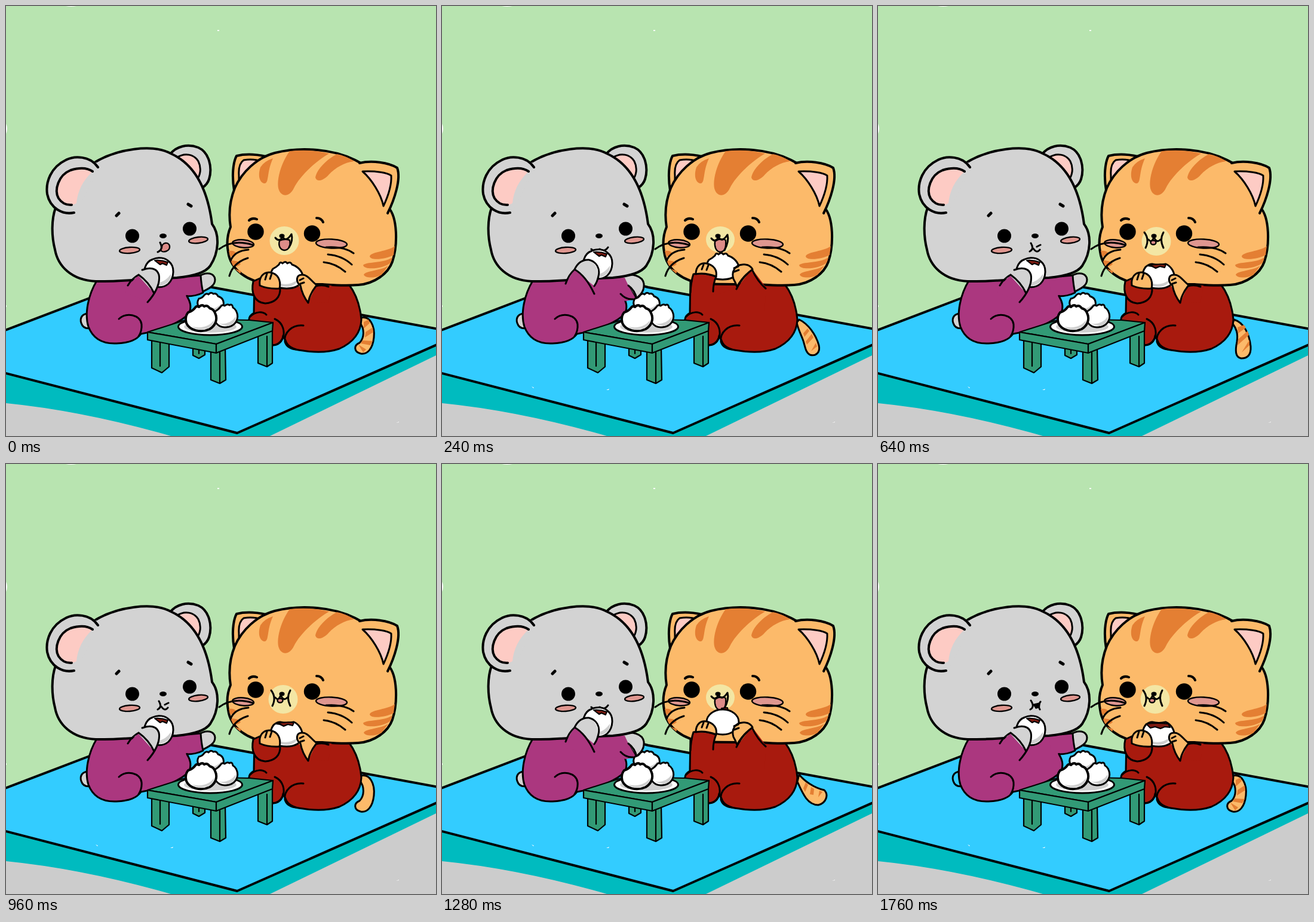
Write an HTML page that moves like this. It is 720 px wide and 720 px high and loops after 1840 ms.

```html
<!DOCTYPE html>
<html lang="en">
<head>
<meta charset="utf-8">
<title>Sharing steamed buns</title>
<style>
  html, body { margin: 0; width: 100%; height: 100%; overflow: hidden; background: #b8e4b0; }
  svg { display: block; width: 100vw; height: 100vh; }
  path, ellipse { stroke: #000; stroke-width: 4; stroke-linecap: round; stroke-linejoin: round; fill: none; }
  .thin { stroke-width: 3; }
  .bold { stroke-width: 5; }
  .flat, .flat * { stroke: none; }
  .wall { fill: #b8e4b0; }
  .floor { fill: #ccc; }
  .side { fill: #00bbbf; }
  .mat { fill: #3cf; }
  .gray { fill: #d3d3d3; }
  .purple { fill: #ab377f; }
  .orange { fill: #fcba6a; }
  .stripe { fill: #e47f33; stroke: none; }
  .red { fill: #a81a0e; }
  .pink { fill: #fdcbc4; }
  .blush { fill: #df9790; stroke-width: 2.4; }
  .tongue { fill: #dd8c88; stroke-width: 2.4; }
  .white { fill: #fff; }
  .shade { fill: #cfcfcf; stroke: none; }
  .filling { fill: #7d1a10; stroke-width: 2; }
  .black { fill: #000; stroke: none; }
  .cream { fill: #f3e6a4; stroke: none; }
  .wood * { fill: #329a76; stroke-width: 2.2; }
</style>
</head>
<body>
<svg viewBox="0 0 720 720">
  <defs>
    <g id="mouseBun">
      <path class="white thin" d="M246 424C254 420 267 421 273 428C283 436 282 455 272 465C262 474 243 472 235 460C227 446 233 428 246 424Z"/>
      <path class="shade" d="M247 463Q264 466 276 449C278 460 266 471 249 468Z"/>
      <path class="filling" d="M249 426Q260 425 271 429L269 434L262 431L258 433Z"/>
    </g>
    <path id="wholeBun" class="white thin" d="M447 440Q453 437 457 433Q459 427 463 431Q468 426 471 431Q476 427 479 433C488 436 497 444 497 454C497 467 484 473 470 473C454 473 442 467 443 454Q443 445 447 440Z"/>
    <path id="bunShade" class="shade" d="M452 461Q470 472 489 458Q484 471 468 470Q456 470 452 461Z"/>
    <g id="chew">
      <ellipse class="cream" cx="466" cy="394" rx="24.5" ry="24"/>
      <path class="thin" d="M446 379Q455 391 448 405M478 379Q471 391 478 405M453 391Q458 398 462 387Q467 398 473 391"/>
      <ellipse class="tongue" cx="461" cy="396" rx="4.5" ry="3.5"/>
    </g>
  </defs>

  <!-- room and mat -->
  <g class="flat">
    <path class="wall" d="M0 0H720V720H0Z"/>
    <path class="floor" d="M0 640L387 690L720 575V720H0Z"/>
    <path class="side" d="M0 615L387 700L720 568V585L442 720H276Q130 678 0 665Z"/>
    <path class="white" d="M100 0Q109 2 118 0ZM0 197Q4 205 0 214ZM354 40h3v2h-3ZM0 501h1v3h-1ZM653 698l5-2v1Z"/>
  </g>
  <path class="mat" d="M-4 544L140 489L330 467L345 471L724 541V566L387 715L-4 614Z"/>
  <g class="flat" data-on="1-22"><path class="white" d="M150 637l4 2-1 1ZM275 643l5-2-1 2Z"/></g>

  <!-- mouse body -->
  <path class="gray thin" data-on="0-20" d="M140 515C128 514 123 522 126 531C129 540 136 541 144 539"/>
  <path class="thin" data-on="21-22" d="M140 515C128 514 123 522 126 531C129 540 136 541 144 539"/>
  <path class="gray thin" data-on="0-1 5-14 18-22" d="M322 453C336 444 349 447 350 458C350 470 337 474 326 480Z"/>
  <path class="purple thin" data-on="0-1 5-14 18-22" d="M292 454L326 451Q327 467 330 480Q318 486 303 486L285 480Z"/>
  <path class="purple thin" d="M152 460C138 483 131 515 138 537C146 558 163 566 185 565C207 564 219 559 226 549C258 544 294 530 307 514C311 502 308 494 303 486L300 450Z"/>
  <path class="purple flat" data-on="0-1 5-14 18-22" d="M285 452H306V484H290Z"/>
  <g data-on="2-4 15-17">
    <path class="gray thin" d="M299 453C318 446 336 452 338 465C339 478 332 484 325 490L312 470Z"/>
    <path class="purple flat" d="M280 450L306 455L312 468L325 491L308 494L280 490Z"/>
    <path class="thin" d="M299 482Q308 492 320 491M312 468Q323 476 326 490"/>
  </g>
  <path class="thin" d="M189 524C202 512 225 517 227 533Q228 544 222 553"/>

  <!-- cat tail -->
  <g data-on="0 10-12 22">
    <path class="orange thin" d="M594 522C609 518 618 535 616 555C614 574 605 584 594 582C582 579 582 568 592 564C600 556 601 540 592 530Z"/>
    <path class="stripe" data-on="0 10-11 22" d="M599 529L607 525L609 531L599 540ZM602 546L614 538L615 546L601 555ZM597 560L614 561L610 568L594 565ZM590 567L603 575L598 580Z"/>
  </g>
  <g data-on="1-2 8-9 13 21">
    <path class="orange thin" d="M596 525C613 530 622 550 624 570C625 585 618 590 608 590C598 588 598 577 601 562C603 548 600 540 594 532Z"/>
    <path class="stripe" d="M602 538L613 534L616 539L603 548ZM603 558L619 544L621 551L602 568ZM609 580L622 559V568Z"/>
  </g>
  <g data-on="3 6-7 14-15 19-20">
    <path class="orange thin" d="M598 525C613 532 626 550 631 568C634 580 626 587 616 584C608 580 608 568 604 558C600 548 596 540 594 530Z"/>
    <path class="stripe" d="M605 548L612 540L615 544L607 554ZM609 562L619 549L622 555L611 567ZM618 578L626 564L628 570Z"/>
  </g>
  <g data-on="4-5 16-18">
    <path class="orange thin" d="M598 520C606 530 622 542 640 546C648 554 643 568 630 571C612 571 604 552 595 532Z"/>
    <path class="stripe" d="M605 543L609 533L613 537L608 549ZM616 553L618 541L623 544L622 554ZM630 558L632 547L637 549Z"/>
  </g>

  <!-- cat body -->
  <path class="red thin" d="M416 460L415 514Q404 520 408 530L447 568C456 568 463 562 464 552Q466 556 468 560C472 573 485 576 497 577C520 581 540 580 558 574C580 564 594 548 595 525C593 502 586 482 574 466Z"/>
  <path class="thin" d="M409 520C418 511 430 511 436 517M450 524C464 530 468 546 463 557Q457 568 446 568M498 535C479 533 465 547 467 562Q470 573 485 575"/>

  <!-- mouse head -->
  <path class="gray" d="M275 248C285 235 304 230 322 237C340 245 346 270 340 290Q337 299 329 304Z"/>
  <path class="pink thin" d="M286 254C299 245 315 248 322 260C328 272 325 285 319 291C311 272 300 262 286 254Z"/>
  <path class="gray" d="M150 261C185 240 245 230 276 247C318 266 338 310 345 365C358 382 357 412 342 435C333 448 308 453 286 455C240 456 195 462 150 461C110 459 87 436 82 408C76 385 76 357 83 338Z"/>
  <path class="gray flat" d="M151 262L156 272L116 348L84 338L90 290Z"/>
  <path class="gray" d="M154 270C141 251 115 250 100 258C75 270 66 295 69 315C74 339 95 350 114 346"/>
  <path class="pink flat" d="M145 277C135 270 121 271 108 275C88 283 80 308 88 322C95 335 110 336 118 330C120 310 128 293 145 277Z"/>
  <path d="M145 277C135 270 121 271 108 275C88 283 80 308 88 322Q96 334 110 333"/>
  <g class="flat">
    <ellipse class="black" cx="211.5" cy="385" rx="11.5" ry="11.5"/>
    <ellipse class="black" cx="307.5" cy="373" rx="11.5" ry="11.5"/>
    <ellipse class="black" cx="263" cy="385" rx="6" ry="4"/>
  </g>
  <ellipse class="blush" cx="207" cy="409" rx="17" ry="5" transform="rotate(-4 207 409)"/>
  <ellipse class="blush" cx="322" cy="392" rx="16" ry="5" transform="rotate(-7 322 392)"/>
  <path class="bold" data-on="0-17 21-22" d="M185 351L189 347M305 332L310 335"/>
  <path class="bold" data-on="18-20" d="M185 353Q184 348 189 347M307 332L312 338"/>
  <g data-on="0-1">
    <path class="tongue" d="M261 404C261 396 272 394 274 402C275 411 262 414 259 409Z"/>
    <path class="thin" d="M258 396Q264 408 254 412"/>
  </g>
  <path class="thin" data-on="2-4 15-17" d="M250 407Q256 414 264 407Q272 413 278 404"/>
  <path class="thin" data-on="5-14" d="M256 397Q262 407 254 411M260 406Q266 415 271 408M266 403L272 400"/>
  <g data-on="18-20">
    <path class="thin" d="M256 397Q263 407 255 412"/>
    <ellipse class="tongue" cx="263" cy="406" rx="4" ry="4.5"/>
  </g>
  <g data-on="21-22">
    <path class="thin" d="M256 396Q263 407 255 411M272 398Q267 404 271 411"/>
    <path class="black" d="M259 402L272 399L271 408L264 410Z"/>
  </g>

  <!-- cat head -->
  <path class="orange" d="M382 309C378 285 380 262 386 251C402 247 424 248 442 254L420 285Z"/>
  <path class="pink thin" d="M390 284C389 270 392 262 398 258C410 256 420 257 430 261C412 272 402 285 390 300Z"/>
  <path class="orange" d="M383 305C395 278 420 254 450 246C490 236 550 237 594 263C622 280 638 312 640 337C656 354 656 400 647 428C640 448 617 465 590 467C565 469 545 467 530 466C495 466 462 466 440 465C405 462 376 442 372 412C369 396 370 384 376 370C372 345 375 325 383 305Z"/>
  <path class="stripe" d="M426 270C421 285 425 296 433 297C441 296 436 279 447 255Q432 260 426 270ZM475 243C461 262 453 290 456 305C460 321 475 320 482 305C490 288 515 262 541 247Q510 239 475 243ZM554 248C535 258 520 275 518 287C520 296 532 292 540 283C552 270 567 262 583 260Q570 251 554 248Z"/>
  <path class="stripe" d="M651 402C640 411 612 411 609 419C610 427 636 424 649 417ZM647 421C632 431 602 428 598 434C600 443 632 440 644 430ZM640 435C625 444 602 443 599 450C602 457 622 455 629 450ZM373 410Q383 409 385 414Q383 419 375 419ZM376 426Q390 426 393 432Q388 438 380 435ZM383 440L394 444L392 448Z"/>
  <path class="orange flat" d="M592 264L650 272L645 340L636 340Z"/>
  <path class="orange" d="M592 263C612 258 641 262 655 271C662 290 650 325 639 347"/>
  <path class="pink thin" d="M597 277C620 276 638 279 645 284C646 300 639 320 632 335C628 315 612 290 597 277Z"/>
  <g class="flat">
    <ellipse class="black" cx="418" cy="378" rx="13.7" ry="13.7"/>
    <ellipse class="black" cx="512.5" cy="381" rx="13.7" ry="13.7"/>
  </g>
  <path data-on="0-17 21-22" d="M407 359Q412 354 420 357M520 355Q528 355 531 362"/>
  <path data-on="18-20" d="M405 359Q409 350 420 354M524 354Q532 353 533 361"/>
  <ellipse class="blush" cx="397" cy="398" rx="18" ry="6.5" transform="rotate(5 397 398)"/>
  <ellipse class="blush" cx="545" cy="398" rx="26" ry="7.5" transform="rotate(3 545 398)"/>
  <path class="thin" d="M357 407Q380 390 413 400M406 408Q382 410 376 427M405 422Q380 430 374 452M536 404Q566 402 582 414M539 416Q563 418 579 433M532 429Q552 431 568 445"/>
  <g data-on="0-1">
    <ellipse class="cream" cx="466" cy="393" rx="24.5" ry="24"/>
    <path class="tongue" d="M458 393Q466 389 475 392C477 402 473 409 466 409C458 408 456 400 458 393Z"/>
    <path class="thin" d="M451 388Q457 396 463 387Q469 396 478 382Q481 393 474 404"/>
  </g>
  <g data-on="2-4 15-17">
    <ellipse class="cream" cx="466" cy="391" rx="24" ry="22"/>
    <path class="tongue" d="M457 394Q466 388 475 392C476 404 474 411 466 412C458 411 456 402 457 394Z"/>
    <path class="thin" d="M451 389Q457 397 463 387Q469 397 478 383Q481 394 473 409"/>
  </g>
  <use href="#chew" data-on="5-10"/>
  <use href="#chew" x="-2" data-on="11-14 21-22"/>
  <g data-on="18-20">
    <ellipse class="cream" cx="466" cy="393" rx="24.5" ry="24"/>
    <path class="thin" d="M449 382Q456 391 450 402M473 382Q468 391 474 403M453 390Q462 400 472 391"/>
    <path class="black" d="M455 390L469 389L467 396L457 396Z"/>
  </g>
  <ellipse class="black" cx="462" cy="385" rx="4.5" ry="3.5"/>

  <!-- mouse bun and paw -->
  <g data-on="0-1 5-14 18-22">
    <use href="#mouseBun"/>
    <path class="purple flat" d="M203 470L222 450L250 480L238 496L200 480Z"/>
    <path class="gray flat" d="M221 451C229 439 242 436 250 441C261 452 256 468 248 481Z"/>
    <path class="thin" d="M204 468Q211 456 222 450M228 442C242 436 253 440 256 450C259 466 248 484 237 496M222 450Q239 462 248 481"/>
  </g>
  <g data-on="2-4 15-17">
    <use href="#mouseBun" x="5" y="-14"/>
    <path class="purple flat" d="M206 467L222 440L256 470L246 484L206 476Z"/>
    <path class="gray flat" d="M221 441C231 425 246 424 253 430C264 440 262 456 255 469Z"/>
    <path class="thin" d="M207 465Q212 450 222 441Q230 424 246 425C259 428 265 440 262 452Q260 462 255 469M222 441Q241 452 255 482"/>
  </g>

  <!-- cat bun -->
  <g data-on="0-1"><use href="#wholeBun"/><use href="#bunShade"/></g>
  <use href="#wholeBun" y="-15" data-on="2-4"/>
  <g data-on="15-17">
    <ellipse class="white thin" cx="470" cy="432" rx="27" ry="21"/>
    <path class="filling" d="M468 409L478 408L479 412L472 411Z"/>
  </g>
  <g data-on="5-14 18-22">
    <path class="white thin" d="M448 437Q454 432 459 432Q470 435 482 432C491 436 497 446 496 455C496 467 484 473 470 473C454 473 443 467 443 455Q442 445 448 437Z"/>
    <use href="#bunShade"/>
    <path class="filling" data-on="5-14" d="M452 435Q468 431 482 433L480 438L472 436L465 439L459 436Z"/>
    <path class="filling" data-on="18-22" d="M449 435Q468 433 486 435L489 441L480 440L473 443L464 440L456 442Z"/>
  </g>

  <!-- cat paws -->
  <g data-on="0-1 5-14 18-22">
    <path class="red thin" d="M414 461C410 479 415 496 434 498C450 497 460 488 459 472L425 456Z"/>
    <path class="orange thin" d="M425 468C423 454 431 445 442 446C455 448 461 459 458 473Q438 474 425 468Z"/>
    <path class="orange flat" d="M488 464C484 452 494 446 504 451L520 468L506 496L496 478Z"/>
    <path class="red flat" d="M507 496L519 468L545 468L540 497Z"/>
    <path class="thin" d="M493 468C485 462 485 450 496 450C506 450 510 460 521 468M493 468Q496 484 506 497Q508 483 519 469Q530 466 540 470M434 458L437 448M442 457L445 448M492 459L498 456M493 465L499 463"/>
  </g>
  <g data-on="2-4 15-17">
    <path class="red flat" d="M417 510L420 448L458 452L454 485L494 472L519 440L543 472L540 510Z"/>
    <path class="thin" d="M416 480Q417 460 421 449Q438 446 459 453Q454 465 454 478M493 474Q502 455 519 441Q528 461 542 473"/>
    <path class="orange thin" d="M425 449C425 436 433 429 443 431C456 434 461 443 459 453Q440 446 425 449Z"/>
    <path class="orange thin" d="M488 457C484 444 491 434 503 433C513 432 518 437 520 441Q504 452 494 470Q491 462 488 457Z"/>
    <path class="thin" d="M435 441L438 433M443 442L446 434M489 439L496 436M489 445L497 442"/>
  </g>

  <!-- table and snacks -->
  <g class="wood">
    <path d="M313 570V585L323 590L333 584V570ZM323 574V582"/>
    <path d="M244 556V606L261 614L273 604V560ZM258 562V603"/>
    <path d="M422 550V598L437 604L446 598V540ZM437 553V603"/>
    <path d="M343 575V626L358 632L368 626L367 570ZM358 580V631"/>
    <path d="M237 546L306 524L408 526L447 530L352 566Z"/>
    <path d="M237 546L352 566V581L237 559Z"/>
    <path d="M352 566L447 530L446 544L352 581Z"/>
  </g>
  <ellipse class="white thin" cx="342" cy="537" rx="53.5" ry="14"/>
  <ellipse class="shade" cx="342" cy="537" rx="44" ry="10"/>
  <path class="white thin" d="M323 490Q329 489 332 484Q336 480 339 483Q343 478 347 482Q352 480 355 486Q361 488 363 492C366 498 364 506 358 510H329C320 503 319 496 323 490Z"/>
  <path class="shade" d="M338 507Q354 508 361 497Q361 508 355 511H340Z"/>
  <path class="white thin" d="M349 512Q355 509 359 504Q362 499 366 502Q371 498 374 501Q379 498 380 505Q384 507 386 512C390 521 387 533 374 537C358 541 346 532 349 512Z"/>
  <path class="shade" d="M355 532Q376 534 385 519Q385 533 372 536Z"/>
  <path class="white" d="M305 513Q312 511 316 506Q319 501 323 504Q328 499 332 503Q337 500 341 506Q348 508 350 514C355 524 351 535 341 541C326 548 307 543 302 531Q299 520 305 513Z"/>
  <path class="shade" d="M312 537Q337 542 349 525Q347 537 336 540Q322 544 312 537Z"/>
</svg>
<script>
  const STEP = 80, STEPS = 23;

  // "0-1 5" lists the steps during which an element is drawn.
  const parts = [...document.querySelectorAll('[data-on]')].map(el => ({
    el,
    spans: el.dataset.on.split(' ').map(span => {
      const [from, to = from] = span.split('-').map(Number);
      return [from, to];
    })
  }));

  const start = performance.now();
  let shown = -1;

  function draw() {
    const step = Math.floor((performance.now() - start) / STEP) % STEPS;
    if (step !== shown) {
      for (const { el, spans } of parts) {
        const on = spans.some(([from, to]) => step >= from && step <= to);
        el.style.display = on ? '' : 'none';
      }
      shown = step;
    }
    requestAnimationFrame(draw);
  }
  draw();
</script>
</body>
</html>
```
